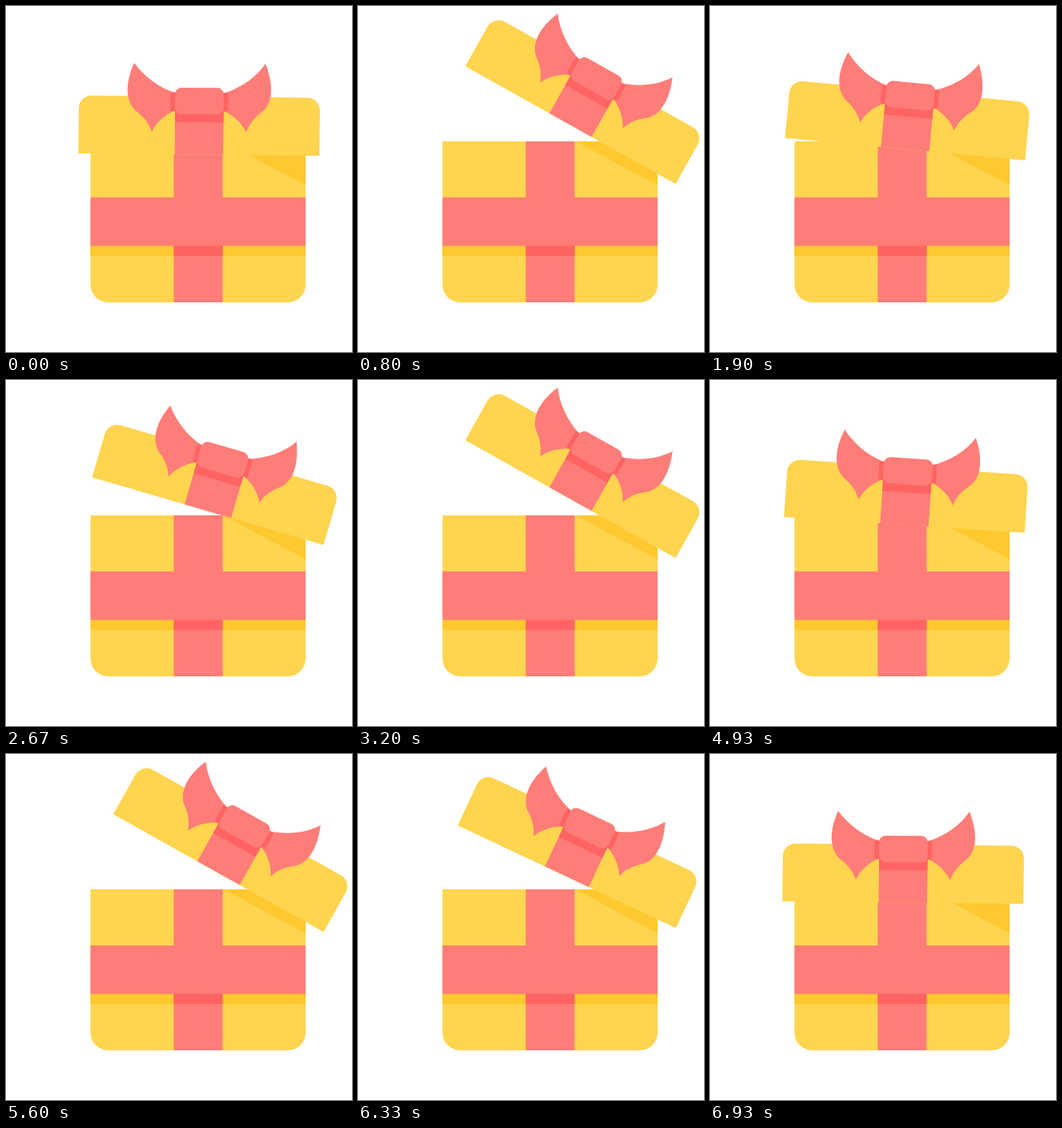
An HTML page for the animation above (7160 ms loop, 432 by 432 pixels).

```html
<!DOCTYPE html>
<html lang="en">
<head>
<meta charset="utf-8">
<title>Gift box</title>
<style>
  html, body { margin: 0; width: 100%; height: 100%; overflow: hidden; background: #fff; }
  svg { display: block; width: 100vw; height: 100vh; }
  .gold { fill: #ffd44f; }
  .amber { fill: #ffc82f; }
  .pink { fill: #ff7d78; }
  .rose { fill: #ff6463; }
</style>
</head>
<body>
<svg viewBox="0 0 432 432">
  <g id="confetti"></g>

  <g id="box">
    <path class="gold" d="M105.5 169H374V348a22 22 0 0 1-22 22H127.500a22 22 0 0 1-22-22Z"/>
    <path class="amber" d="M272 169H374V224Z"/>
    <path class="amber" d="M105.500 299H374V312H105.500Z"/>
    <path class="pink" d="M209.500 169H270.500V370H209.500Z"/>
    <path class="rose" d="M209.500 299H270.500V312H209.500Z"/>
    <path class="pink" d="M105.500 239H374V299.500H105.500Z"/>
  </g>

  <g id="lid">
    <path class="gold" d="M90 186.400V130a16 16 0 0 1 16-16H375a16 16 0 0 1 16 16V186.400Z"/>
    <path class="pink" d="M210.300 120H270.800V186.400H210.300Z"/>
    <path class="rose" d="M210.300 130H270.800V146H210.300Z"/>
    <path class="pink" d="M158.500 72.700C170 88 187 102 210 109.500V131.500C196 138 187 147 181.500 158.500C177 147 171 140 163 134C149 123 146 101 158.500 72.700Z"/>
    <path class="pink" d="M322.500 72C312 88 294 102 271 109.500V131.500C285 138 294 147 299.400 158C303 147 309 140 318 133C333 122 333 98 322.500 72Z"/>
    <rect class="rose" x="204.300" y="109" width="14" height="23.500" rx="3"/>
    <rect class="rose" x="262.500" y="109" width="14" height="23.500" rx="3"/>
    <rect class="pink" x="210" y="103" width="60.800" height="33" rx="8"/>
  </g>
</svg>

<script>
const LOOP = 7160, CYCLE = 2400, PEAK = 1067, END = 2133, STEP = 200 / 3;
const REST = 0.6, OPEN = 30;
const SOURCE = 215; // where the pieces fly out of, on both axes

const lid = document.getElementById('lid');
const confetti = document.getElementById('confetti');

function add(tag, attrs) {
  const el = document.createElementNS('http://www.w3.org/2000/svg', tag);
  for (const key in attrs) el.setAttribute(key, attrs[key]);
  return confetti.appendChild(el);
}

function star(x, y, r, turn) {
  const points = [];
  for (let i = 0; i < 10; i++) {
    const a = (turn + i * 36) * Math.PI / 180;
    const d = i % 2 ? r * 0.56 : r;
    points.push((d * Math.cos(a)).toFixed(2) + ',' + (d * Math.sin(a)).toFixed(2));
  }
  return { x, y, el: add('polygon', { class: 'gold', points: points.join(' ') }) };
}

function dot(x, y) {
  return { x, y, el: add('circle', { class: 'pink', r: 13.4 }) };
}

const pieces = [
  star(44.4, 57, 47, 15),
  star(105.8, 119.6, 46.5, 1.8),
  dot(44.5, 185),
  dot(189, 134)
];

// Cubic easing with flat ends and handles at x1 and x2.
function ease(u, x1, x2) {
  if (u <= 0) return 0;
  if (u >= 1) return 1;
  let lo = 0, hi = 1, s = 0.5;
  for (let i = 0; i < 30; i++) {
    s = (lo + hi) / 2;
    const x = 3 * (1 - s) * (1 - s) * s * x1 + 3 * (1 - s) * s * s * x2 + s * s * s;
    if (x < u) lo = s; else hi = s;
  }
  return s * s * (3 - 2 * s);
}

function openness(t) {
  return t < PEAK
    ? ease(t / PEAK, 0.3, 0)
    : 1 - ease((t - PEAK) / (END - PEAK), 0.81, 0.515);
}

function render(time) {
  const local = (time % LOOP) % CYCLE;
  const p = openness(Math.floor((local + 4) / STEP) * STEP);
  const angle = REST + (OPEN - REST) * p;
  lid.setAttribute('transform', `rotate(${angle.toFixed(3)} 325 215)`);

  const q = 1 - (1 - p) * (1 - p);
  for (const { x, y, el } of pieces) {
    const px = SOURCE + (x - SOURCE) * q;
    const py = SOURCE + (y - SOURCE) * q;
    el.setAttribute('transform', `translate(${px.toFixed(2)} ${py.toFixed(2)}) scale(${q.toFixed(4)})`);
  }
}

const start = performance.now();
function tick() {
  render(performance.now() - start);
  requestAnimationFrame(tick);
}
tick();
</script>
</body>
</html>
```
